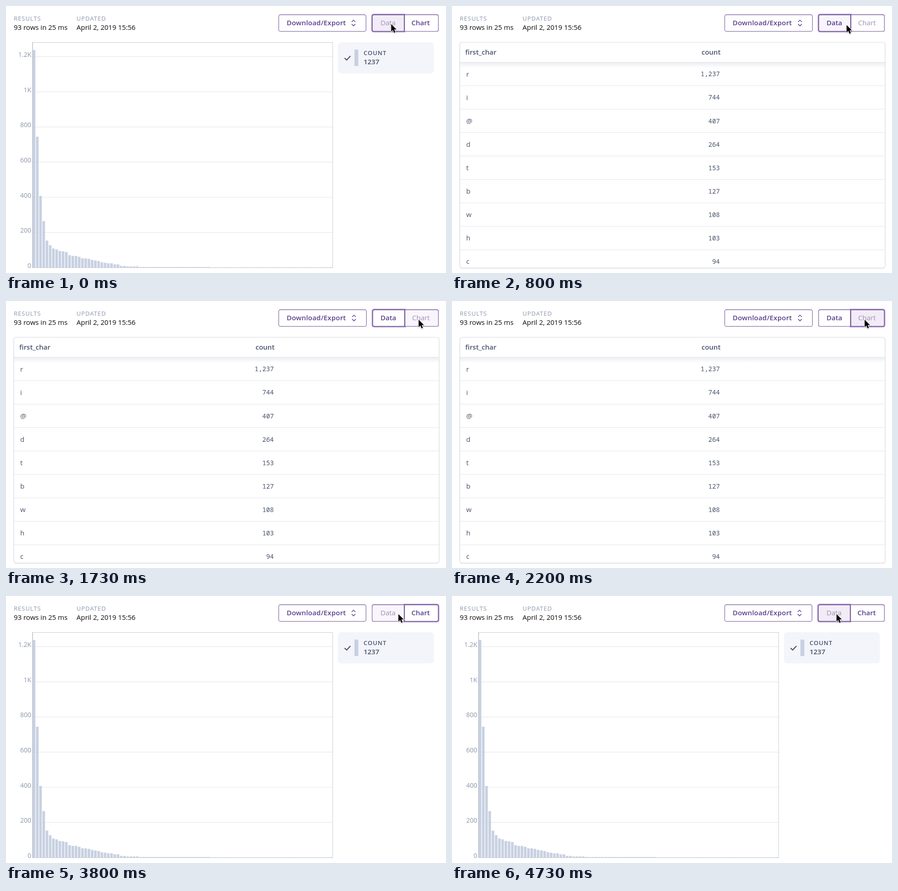
Write an HTML page that moves like this. It is 961x582 px and loops after 4.79 s.

```html
<!DOCTYPE html>
<html lang="en">
<head>
<meta charset="utf-8">
<title>Query results</title>
<style>
  html, body { margin: 0; width: 100%; height: 100%; overflow: hidden; background: #fff; }
  svg { display: block; }
  text { font: 15px "Open Sans", "Noto Sans", sans-serif; fill: #47536b; }
  .bold { font-weight: 600; }
  .label { font-size: 13px; letter-spacing: 1px; }
  .muted { fill: #8b95ad; }
  .tick { font-size: 14px; text-anchor: end; }
  .ink { fill: #0a0a0a; }
  .num { font: 14px "Noto Sans Mono", "DejaVu Sans Mono", monospace; text-anchor: end; }
  .on { font-weight: 600; fill: #5d3f8e; }
  .off { fill: #a18eb8; }
</style>
</head>
<body>
<svg width="961" height="582" viewBox="0 0 961 582">
  <defs>
    <linearGradient id="fade" x2="0" y2="1">
      <stop offset="0" stop-color="#eceef2"/>
      <stop offset="1" stop-color="#fff"/>
    </linearGradient>
    <filter id="shade" x="-50%" y="-50%" width="200%" height="200%">
      <feDropShadow dx="0" dy="1" stdDeviation="1" flood-opacity=".3"/>
    </filter>
    <clipPath id="panel"><rect x="17" y="79" width="929" height="492" rx="5"/></clipPath>
  </defs>
  <g id="header"></g>
  <g id="chart"></g>
  <g id="table"></g>
  <g id="controls"></g>
  <path id="cursor" d="M0 0V16.2L3.8 12.7L6.4 18.9L9.2 17.7L6.6 11.6H11.6Z"
    fill="#000" stroke="#fff" stroke-width="1.8" paint-order="stroke" filter="url(#shade)"/>
</svg>
<script>
const LOOP = 4790, STEP = 200 / 3;
const byId = id => document.getElementById(id);
const text = (x, y, cls, str) => `<text x="${x}" y="${y}" class="${cls}">${str}</text>`;
const rect = (x, y, w, h, attrs) => `<rect x="${x}" y="${y}" width="${w}" height="${h}" ${attrs}/>`;
const line = (d, color, width = 1) => `<path d="${d}" fill="none" stroke="${color}" stroke-width="${width}"/>`;

const counts = [1237, 744, 407, 264, 153, 127, 108, 103, 94, 92, 88, 70, 66, 66, 61, 52, 52, 49,
  43, 40, 37, 30, 27, 24, 24, 18, 18, 9, 9, 6, 6, 6, 6];

function headerMarkup() {
  return text(17, 31.7, 'label muted', 'RESULTS') + text(17, 52.3, 'ink', '93 rows in 25 ms') +
    text(154, 31.7, 'label muted', 'UPDATED') + text(154, 52.3, 'ink', 'April 2, 2019 15:56');
}

function chartMarkup() {
  const base = 570, unit = 76.65 / 200, bar = '#c8d1e2';
  let out = '';
  ['0', '200', '400', '600', '800', '1K', '1.2K'].forEach((name, i) => {
    const y = base - i * 76.65;
    if (i) out += line(`M58 ${y + .3}H713`, '#e7e8ea', 1.2);
    out += text(55, y + 1, 'tick muted', name);
  });
  for (let i = 0; i < 93; i++) {
    const value = counts[i] ?? (i < 55 ? 3 : 1);
    out += rect(58.4 + i * 7.05, base - value * unit, 5.7, value * unit, `fill="${bar}"`);
  }
  out += rect(58, 79.5, 655.5, 491, 'fill="none" stroke="#c9cbd1"') + line('M58 79V571', '#b4b8c1');
  out += rect(725, 79, 209.5, 68, 'rx="7" fill="#f4f5fa"');
  out += line('M739.5 113.5L744 117.8L752.3 109', '#434f66', 2.2);
  out += rect(761, 95, 8.5, 36, `fill="${bar}"`);
  return out + text(781, 107.2, 'label bold', 'COUNT') + text(781, 127.2, 'bold', '1237');
}

function tableMarkup() {
  let rows = rect(17, 123, 929, 12, 'fill="url(#fade)"') + line('M17 122.8H946', '#dfe1e6');
  [...'ri@dtbwhc'].forEach((char, i) => {
    const y = 122.6 + i * 51.1;
    if (i) rows += line(`M17 ${y}H946`, '#e3e5e9');
    rows += text(31, y + 31, '', char) + text(585, y + 30.7, 'num', counts[i].toLocaleString('en-US'));
  });
  return line('M18 572.2H945', '#eceef1', 1.5) + `<g clip-path="url(#panel)">${rows}</g>` +
    rect(17, 79, 929, 492, 'rx="5" fill="none" stroke="#d6d9df" stroke-width="1.2"') +
    text(29, 105.8, 'bold', 'first_char') + text(545, 105.8, 'bold', 'count');
}

// Linear interpolation through [tick, value] pairs.
function track(keys, tick) {
  const next = keys.findIndex(key => key[0] >= tick);
  if (next < 0) return keys.at(-1)[1];
  if (!next) return keys[0][1];
  const [t0, a] = keys[next - 1], [t1, b] = keys[next];
  return a + (b - a) * (tick - t0) / (t1 - t0);
}

const cursorX = [[5, 841.3], [6, 842.5], [12, 861.8], [13, 866.5], [21, 898], [26, 901.3], [44, 901.3],
  [45, 899.5], [52, 876], [57, 857], [60, 846], [65, 839.8]];
const cursorY = [[5, 39.5], [12, 41.5], [13, 42.2], [17, 44.5], [21, 44], [26, 40.8], [45, 40.8], [57, 39.5], [65, 39.5]];
const dataFocus = [[0, 1], [30, 1], [33, 0], [68, 0], [71, 1]];
const press = [[0, 1], [3, 0], [30, 0], [33, 1], [35, 0], [68, 0], [71, 1]];

function segment(x0, x1, roundLeft) {
  const top = 19, bottom = 55.4, r = 4;
  const [near, far, s] = roundLeft ? [x1, x0, 1] : [x0, x1, -1];
  return `M${near} ${top}H${far + s * r}Q${far} ${top} ${far} ${top + r}V${bottom - r}` +
    `Q${far} ${bottom} ${far + s * r} ${bottom}H${near}Z`;
}

function controlsMarkup(tick, isTable, pointerX) {
  const shift = isTable ? 1 : 0, border = '#8b6fa9', mid = 870 + shift * 1.2;
  const shapes = [segment(799.7 + shift, mid, true), segment(mid - shift * .7, 944.4, false)];
  const focus = track(dataFocus, tick), hovered = pointerX < 870.5 ? 0 : 1;
  let out = rect(595.6, 19, 190.7 + shift, 36.4, `rx="4" fill="#fff" stroke="${border}" stroke-width="1.3"`);
  out += `<text x="613" y="42" class="on" letter-spacing=".2">Download/Export</text>`;
  out += `<g transform="translate(${shift} 0)">` +
    line('M755 34.8L759 30.8L763 34.8M755 39.4L759 43.4L763 39.4', '#65479a', 1.5) + '</g>';
  shapes.forEach(d => out += line(d, border, 1.3));
  [focus, 1 - focus].forEach((amount, i) => {
    out += `<path d="${shapes[i]}" fill="none" stroke="#d8c6ec" stroke-width="5.4" opacity="${amount}"/>`;
  });
  shapes.forEach((d, i) => {
    out += `<path d="${d}" fill="${i === hovered ? '#f8f5fb' : '#fff'}"/>`;
    if (i === hovered) out += `<path d="${d}" fill="#f2ecf6" opacity="${track(press, tick)}"/>`;
  });
  shapes.forEach(d => out += line(d, border, 1.3));
  [focus, 1 - focus].forEach((amount, i) => {
    out += `<path d="${shapes[i]}" fill="none" stroke="#64428f" stroke-width="1.5" opacity="${amount}"/>`;
  });
  return out + text(818, 42, isTable ? 'on' : 'off', 'Data') +
    text(isTable ? 887 : 885.5, 42, isTable ? 'off' : 'on', 'Chart');
}

function render(tick) {
  const isTable = tick >= 1 && tick < 34;
  const x = track(cursorX, tick), y = track(cursorY, tick);
  byId('chart').style.display = isTable ? 'none' : '';
  byId('table').style.display = isTable ? '' : 'none';
  byId('controls').innerHTML = controlsMarkup(tick, isTable, x);
  byId('cursor').setAttribute('transform', `translate(${x} ${y})`);
}

byId('header').innerHTML = headerMarkup();
byId('chart').innerHTML = chartMarkup();
byId('table').innerHTML = tableMarkup();

let shown = 0;
const start = performance.now();
function loop() {
  const time = (performance.now() - start) % LOOP;
  const tick = Math.floor((time + 3.5) / STEP);
  if (tick !== shown) render(shown = tick);
  requestAnimationFrame(loop);
}
render(0);
requestAnimationFrame(loop);
</script>
</body>
</html>
```
